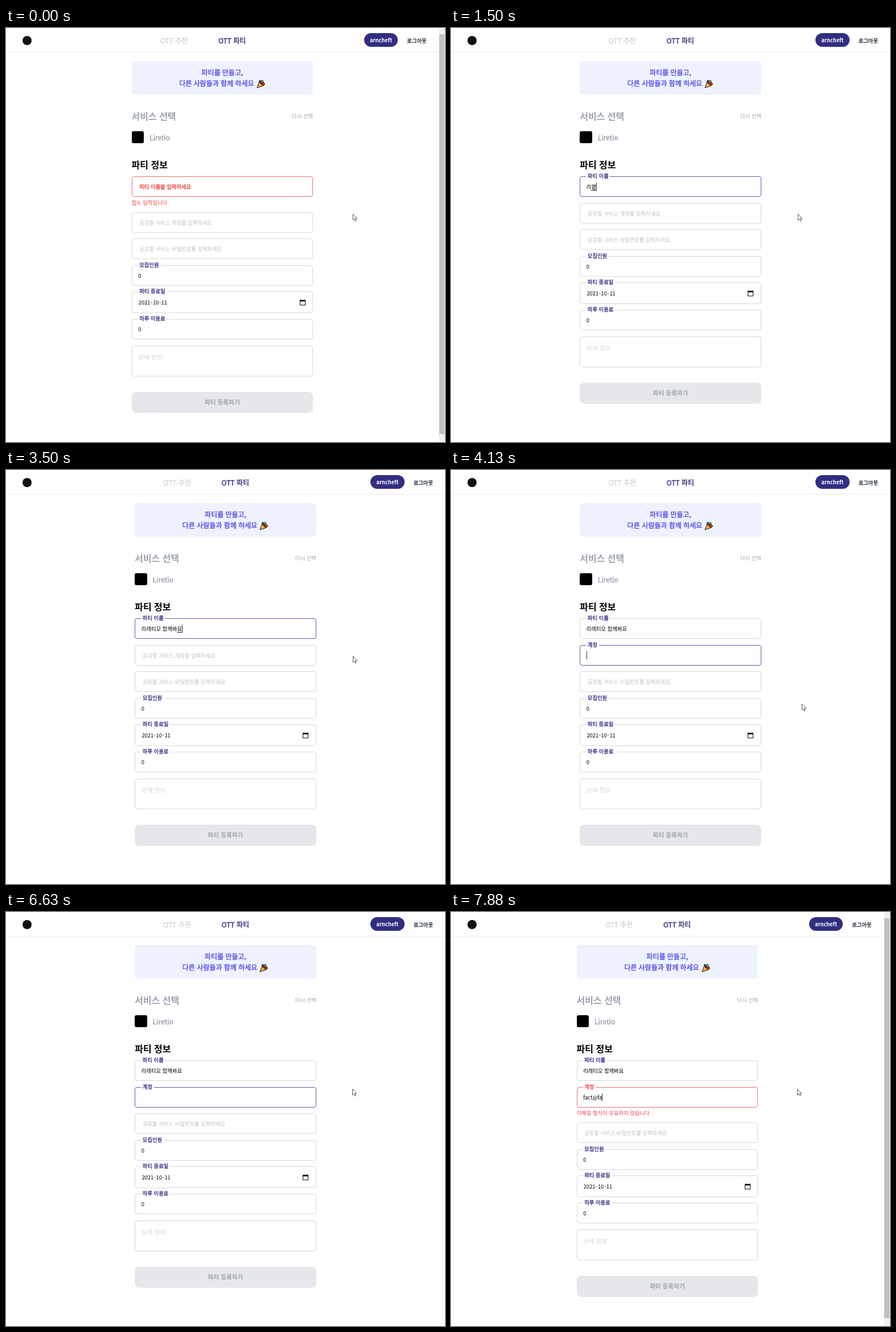
An HTML page for the animation above (8 s loop, 771 by 726 pixels).

```html
<!DOCTYPE html>
<html lang="ko">
<head>
<meta charset="utf-8">
<title>OTT 파티</title>
<style>
html, body { margin: 0; width: 100%; height: 100%; overflow: hidden; background: #fff; }
body { font: 400 9.33px/20px "Noto Sans CJK KR", "Noto Sans KR", "Noto Sans CJK JP", "Noto Sans CJK", sans-serif; color: #000; }
#stage { --w: 771px; position: absolute; inset: 0; overflow: hidden; white-space: pre; }
#stage.scroll { --w: 759.67px; }
#stage * { position: absolute; box-sizing: border-box; }
#stage span { position: static; }

/* medium weight, thickened from regular */
.nav, .out, .banner, .service, .label { -webkit-text-stroke: .035em currentColor; }

header { left: 0; top: 0; width: var(--w); height: 43px; border-bottom: 1px solid #ebecef; }
.logo { left: 29px; top: 14px; width: 16px; height: 16px; border-radius: 50%; background: #111; }
.nav { top: 12px; font-size: 12px; color: #312e81; }
.badge { right: 71.5px; top: 9.3px; width: 59.3px; height: 24px; border-radius: 12px; background: #312e81; color: #fff; font-weight: 700; line-height: 24px; text-align: center; }
.out { right: 21px; top: 12px; color: #1f2937; }

main { left: calc(var(--w) / 2 - 159.33px); top: 0; width: 318.67px; height: 726px; }
.banner { top: 58.3px; width: 100%; height: 58.6px; padding-top: 10.67px; border-radius: 5.3px; background: #eef2ff; color: #5850ea; font-size: 12px; line-height: 18.67px; text-align: center; }
.banner span { display: inline-block; width: 16.5px; }
h2 { margin: 0; font-size: 16px; font-weight: 700; line-height: 24px; }
.muted { color: #9ca3af; }
.icon { top: 180.67px; width: 21.6px; height: 21.6px; border-radius: 3px; background: #000; }
.service { left: 31.7px; top: 181.5px; font-size: 12px; }

.field { left: 0; width: 318.67px; height: 36px; border: 1px solid #d5d8de; border-radius: 4px; }
.field.focus { border-color: #5f5ca2; }
.field.error { border-color: #f27272; }
.value { left: 10.7px; top: 0; height: 100%; display: flex; align-items: center; }
.value span { flex: none; }
.value .ime { text-decoration: underline 1px; text-underline-offset: 2px; }
#stage .caret { width: 1px; height: 14px; background: #333; }
.label { left: 10px; top: 8px; height: 18px; padding: 0 2.67px; line-height: 18px; background: #fff; color: #d1d5db; }
.mid .label { top: 0; box-shadow: 0 -1px rgba(255, 255, 255, .6); color: #8586a9; }
.up .label { top: -11px; color: #312e81; }
.error .label { color: #ef4444; }
.fromred .label { color: #ac3c59; }
.tored .label { color: #a43b5c; }
.area { height: 54.6px; font-size: 10.67px; color: #d1d5db; padding: 9px 0 0 10.7px; }
.date span { padding: 0 .6px; }
.warn { left: 0; color: #ef4444; }
.submit { top: 622px; width: 100%; height: 36.7px; border-radius: 8px; background: #e5e7eb; color: #9ca3af; font-size: 10.67px; font-weight: 700; line-height: 36.7px; text-align: center; }

.bar { right: 0; top: 0; width: 11.33px; height: 726px; background: #f1f1f1; }
.thumb { left: 1.33px; top: 11px; width: 9px; height: 701px; background: #c1c1c1; }
#pointer { left: 0; top: 0; overflow: visible; }
</style>
</head>
<body>
<div id="stage">
  <header>
    <div class="logo"></div>
    <div class="nav" style="left:calc(50% - 108.9px);color:#d1d5db">OTT 추천</div>
    <div class="nav" style="left:calc(50% - 6.9px)">OTT 파티</div>
    <div class="badge">arncheft</div>
    <div class="out">로그아웃</div>
  </header>
  <main>
    <div class="banner">파티를 만들고,
다른 사람들과 함께 하세요 <span></span></div>
    <svg style="left:219px;top:90px" width="16" height="16" viewBox="0 0 16 16" stroke="#111" stroke-linejoin="round">
      <path d="M4.6 5 11.4 11.4 1 14.8Z" fill="#ffb52e"/>
      <path d="M4.6 5 5 1.8 8.6 2.6 8 7.2Z" fill="#1479c9"/>
      <path d="M8.6 2.6 11 1.6 12 5 8 7.2Z" fill="#ffc83d"/>
      <path d="M8 7.2 12 5 14.8 8.6 11.4 11.4Z" fill="#d0342c"/>
    </svg>
    <h2 class="muted" style="top:142px">서비스 선택</h2>
    <div class="muted" style="right:0;top:144px">다시 선택</div>
    <div class="icon"></div>
    <div class="muted service">Liretio</div>
    <h2 style="top:227px">파티 정보</h2>
    <div class="warn" id="nameWarn" style="top:295.5px">필수 입력입니다</div>
    <div class="warn" id="mailWarn" style="top:342px">이메일 형식이 유효하지 않습니다</div>
    <div class="field" id="name" style="top:260.2px"><div class="value"></div><div class="label"></div></div>
    <div class="field" id="mail" style="top:306.9px"><div class="value"></div><div class="label"></div></div>
    <div id="rest" style="left:0;top:0;width:100%">
      <div class="field" style="top:353.3px"><div class="label">공유할 서비스 비밀번호를 입력하세요</div></div>
      <div class="field up" style="top:400.2px"><div class="value">0</div><div class="label">모집인원</div></div>
      <div class="field up date" style="top:446.4px;height:37.3px">
        <div class="value"><span>2021</span>-<span>10</span>-<span>11</span></div>
        <svg style="left:294px;top:12.5px" width="10" height="11" viewBox="0 0 10 11"><path d="M.5 2.5h9v7.5h-9z" fill="none" stroke="#000"/><path d="M0 1h1.5V0h1v1h5V0h1v1H10v2.4H0z"/></svg>
        <div class="label">파티 종료일</div>
      </div>
      <div class="field up" style="top:494.2px"><div class="value">0</div><div class="label">하루 이용료</div></div>
      <div class="field area" style="top:540.8px">상세 정보</div>
      <div class="submit">파티 등록하기</div>
    </div>
  </main>
  <div class="bar" id="bar">
    <div class="thumb"></div>
    <svg width="11" height="726"><path d="M3 7.2h5.4L5.7 4.4z" fill="#a3a3a3"/><path d="M3 718.6h5.4L5.7 721.4z" fill="#505050"/></svg>
  </div>
  <svg id="pointer" width="10" height="15"><path d="M.5.5v10.6l2.4-2.2 1.7 3.8 1.7-.7-1.7-3.7h3.2z" fill="#fff" stroke="#333" stroke-width=".8"/></svg>
</div>
<script>
const LOOP = 8000;
const $ = id => document.getElementById(id);

// time, committed text, syllable being composed
const nameKeys = [
  [0, '', ''], [750, '', 'ㄹ'], [880, '', '리'], [1130, '', '릴'], [1250, '리', '레'],
  [1500, '리', '렡'], [1630, '리레', '티'], [1750, '리레티', '오'], [1880, '리레티오 ', ''],
  [2380, '리레티오 ', 'ㅎ'], [2500, '리레티오 ', '하'], [2880, '리레티오 ', '함'],
  [3000, '리레티오 함', 'ㄲ'], [3130, '리레티오 함', '께'], [3250, '리레티오 함께', '보'],
  [3380, '리레티오 함께', '봐'], [3500, '리레티오 함께봐', '요'], [4000, '리레티오 함께봐요', '']
];
const mail = 'fact@fa';
const mailKeys = [[0, 0], [6750, 1], [6880, 2], [7000, 3], [7130, 4], [7380, 5], [7880, 7]];
const pointerPath = [[0, 609, 326], [4130, 616, 410], [4250, 621, 503], [4380, 614, 400], [4500, 608, 310]];

const at = (steps, t) => steps.filter(s => s[0] <= t).pop();
const within = (t, a, b) => t >= a && t < b;

function setField(id, flags, label, text, ime, caret) {
  const el = $(id);
  el.className = 'field ' + flags;
  el.querySelector('.label').textContent = label;
  el.querySelector('.value').innerHTML =
    `<span>${text}</span><span class="ime">${ime}</span>` + (caret ? '<span class="caret"></span>' : '');
}

function drawName(t) {
  const [, text, ime] = at(nameKeys, t);
  const focus = within(t, 750, 4000);
  const flags = t < 750 ? 'error' : t < 880 ? 'focus mid fromred' : focus ? 'focus up' : 'up';
  setField('name', flags, t < 750 ? '파티 이름을 입력하세요' : '파티 이름', text, ime, focus);
}

function drawMail(t) {
  const text = mail.slice(0, at(mailKeys, t)[1]);
  const caret = within(t, 4000, 4500) || within(t, 5130, 5630) || within(t, 6130, 6630) || t >= 6750;
  const flags = t < 4000 ? '' : t < 4130 ? 'focus mid' : t < 6750 ? 'focus up' : t < 6880 ? 'error up tored' : 'error up';
  setField('mail', flags, t < 4000 ? '공유할 서비스 계정을 입력하세요' : '계정', text, '', caret);
}

let shown = '';
function draw(t) {
  const nameBad = t < 750, mailBad = t >= 6750;
  const key = [at(nameKeys, t)[0], at(mailKeys, t)[0], at(pointerPath, t)[0],
    [4130, 5130, 5630, 6130, 6630].filter(s => s <= t).length].join();
  if (key === shown) return;
  shown = key;
  drawName(t);
  drawMail(t);
  $('stage').className = nameBad || mailBad ? 'scroll' : '';
  $('bar').style.display = nameBad || mailBad ? '' : 'none';
  $('nameWarn').style.display = nameBad ? '' : 'none';
  $('mailWarn').style.display = mailBad ? '' : 'none';
  $('mail').style.top = (nameBad ? 322.9 : 306.9) + 'px';
  $('rest').style.top = (nameBad || mailBad ? 16 : 0) + 'px';
  const [, x, y] = at(pointerPath, t);
  $('pointer').style.transform = `translate(${x}px, ${y}px)`;
}

const start = performance.now();
function tick() {
  draw((performance.now() - start) % LOOP);
  requestAnimationFrame(tick);
}
tick();
</script>
</body>
</html>
```
